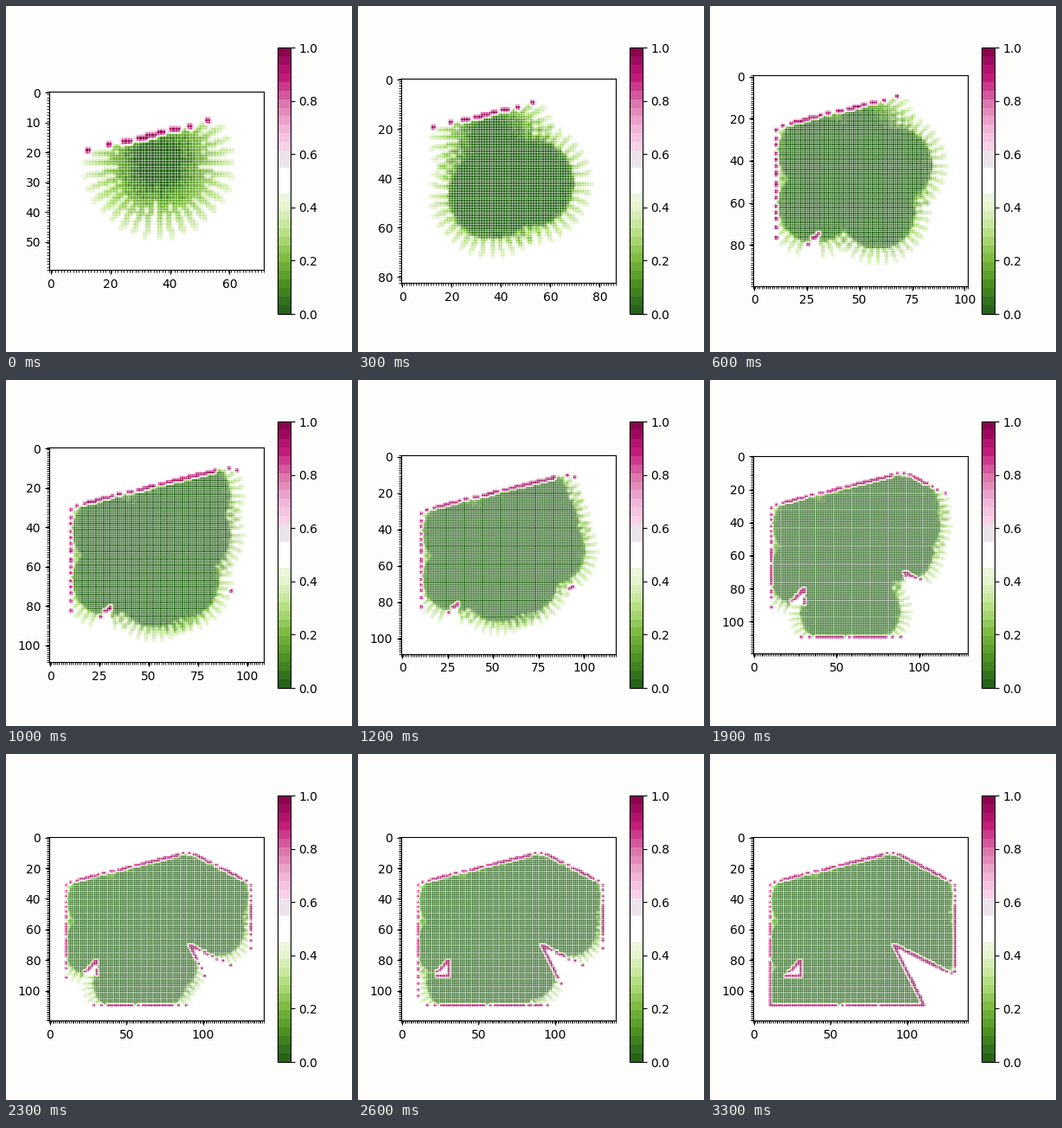
These frames come from a looping animation (400 by 400 pixels, 3400 ms). A matplotlib script:

```python
import itertools

import matplotlib.pyplot as plt
import numpy as np
from matplotlib.animation import FuncAnimation
from matplotlib.colors import ListedColormap
from matplotlib.ticker import MultipleLocator

MARGIN = 10
MAX_RANGE = 25.1
FILL_RANGE = 17
GRID_SHAPE = (132, 152)

ROOM = [(0, 20), (80, 0), (119.4, 19.7), (119.4, 79.7),
        (80, 60), (99.7, 99.4), (0, 99.4)]
PILLAR = [(20, 70), (20, 80), (10, 80)]

# Scanner position at every step
POSES = [(40.5, 19.8), (40.5, 43), (56, 38), (48, 60), (18, 32), (18, 57),
         (57, 58), (42, 63), (63, 34), (63, 14), (72, 42), (68, 26),
         (83, 20), (84, 32), (80, 48), (50, 80), (35, 85), (60, 84),
         (16, 62), (101, 28), (97, 40), (98, 50), (68, 72), (72, 78),
         (23, 85), (98, 44), (24, 90), (14, 90), (84, 86), (102, 60),
         (92, 24), (92, 92), (106, 62)]


def edges(*polygons):
    pairs = [(a, b) for p in polygons for a, b in zip(p, p[1:] + p[:1])]
    start, end = np.array(pairs, float).transpose(1, 0, 2)
    return start, end - start


WALL_START, WALL_DIR = edges(ROOM, PILLAR)


def cross(a, b):
    return a[..., 0] * b[..., 1] - a[..., 1] * b[..., 0]


def wall_distance(pos, ray):
    """Distance from pos to the nearest wall along the unit vector ray."""
    denom = cross(ray, WALL_DIR)
    denom = np.where(np.abs(denom) < 1e-9, 1e-9, denom)
    to_wall = WALL_START - pos
    t = cross(to_wall, WALL_DIR) / denom
    u = cross(to_wall, ray) / denom
    ok = (t > 0) & (u >= -1e-6) & (u <= 1 + 1e-6)
    return t[ok].min() if ok.any() else np.inf


def cells(points):
    """Row and column indices of the 2x2 block under each point."""
    col, row = np.floor(points + (MARGIN + 0.6, MARGIN)).astype(int).T
    for dr, dc in itertools.product((0, 1), repeat=2):
        yield row + dr, col + dc


def scan(pos, log_odds, occupied, dense):
    """Cast all rays from pos, update the map, return the ray ends."""
    ends = []
    step = 10 / 3 if dense else 10
    for i, angle in enumerate(np.radians(np.arange(0, 359.9, step))):
        main = not dense or i % 3 == 0
        reach = MAX_RANGE if main else FILL_RANGE
        ray = np.array([np.cos(angle), np.sin(angle)])
        dist = wall_distance(pos, ray)
        hit = dist <= reach
        length = min(dist, reach)

        r = np.arange(0, max(length - 1.5 * hit, 0.1), 0.6)
        gain = 0.4 + 2.4 * (1 - r / MAX_RANGE)
        layer = np.zeros(GRID_SHAPE)
        for idx in cells(pos + r[:, None] * ray):
            np.maximum.at(layer, idx, gain)
        log_odds -= layer

        end = pos + length * ray
        if hit:
            for idx in cells(end[None]):
                occupied[idx] = True
        if main:
            ends.append(end)
    return np.array(ends)


def build_maps():
    log_odds = np.zeros(GRID_SHAPE)
    occupied = np.zeros(GRID_SHAPE, bool)
    low, high = np.full(2, np.inf), np.full(2, -np.inf)
    maps = []
    for k, pos in enumerate(POSES):
        ends = scan(np.array(pos, float), log_odds, occupied, k > 0)
        low = np.minimum(low, ends.min(axis=0))
        high = np.maximum(high, ends.max(axis=0))
        x0, y0 = np.maximum(np.rint(low).astype(int), 0)
        w, h = np.rint(high).astype(int) - (x0, y0) + 2 * MARGIN + 1
        prob = 1 / (1 + np.exp(-np.clip(log_odds, -8, 8)))
        prob[occupied] = 1
        maps.append(prob[y0:y0 + h, x0:x0 + w])
    return maps


def banded_cmap(n=31):
    colors = plt.get_cmap("PiYG_r")(np.linspace(0, 1, n))
    mid = n // 2
    colors[mid - 1:mid + 2, :3] = 1
    colors[mid + 2:mid + 4, :3] = (0.93, 0.895, 0.92)
    return ListedColormap(colors)


MAPS = build_maps()

fig, ax = plt.subplots(figsize=(4, 4), dpi=100, facecolor="#fdfdfc")
image = ax.imshow(MAPS[0], cmap=banded_cmap(), vmin=0, vmax=1,
                  interpolation="gaussian")
fig.colorbar(image)
for axis in (ax.xaxis, ax.yaxis):
    axis.set_minor_locator(MultipleLocator(1, offset=0.5))
ax.grid(True, which="minor", color="w", linewidth=0.6, alpha=0.5)


def update(i):
    grid = MAPS[max(i - 1, 0)]  # the first map is held for two ticks
    h, w = grid.shape
    image.set_data(grid)
    image.set_extent((-0.5, w - 0.5, h - 0.5, -0.5))
    ax.set_xlim(-0.5, w - 0.5)
    ax.set_ylim(h - 0.5, -0.5)
    return [image]


anim = FuncAnimation(fig, update, frames=len(MAPS) + 1, interval=100,
                     repeat=True, repeat_delay=0)
plt.show()
```
